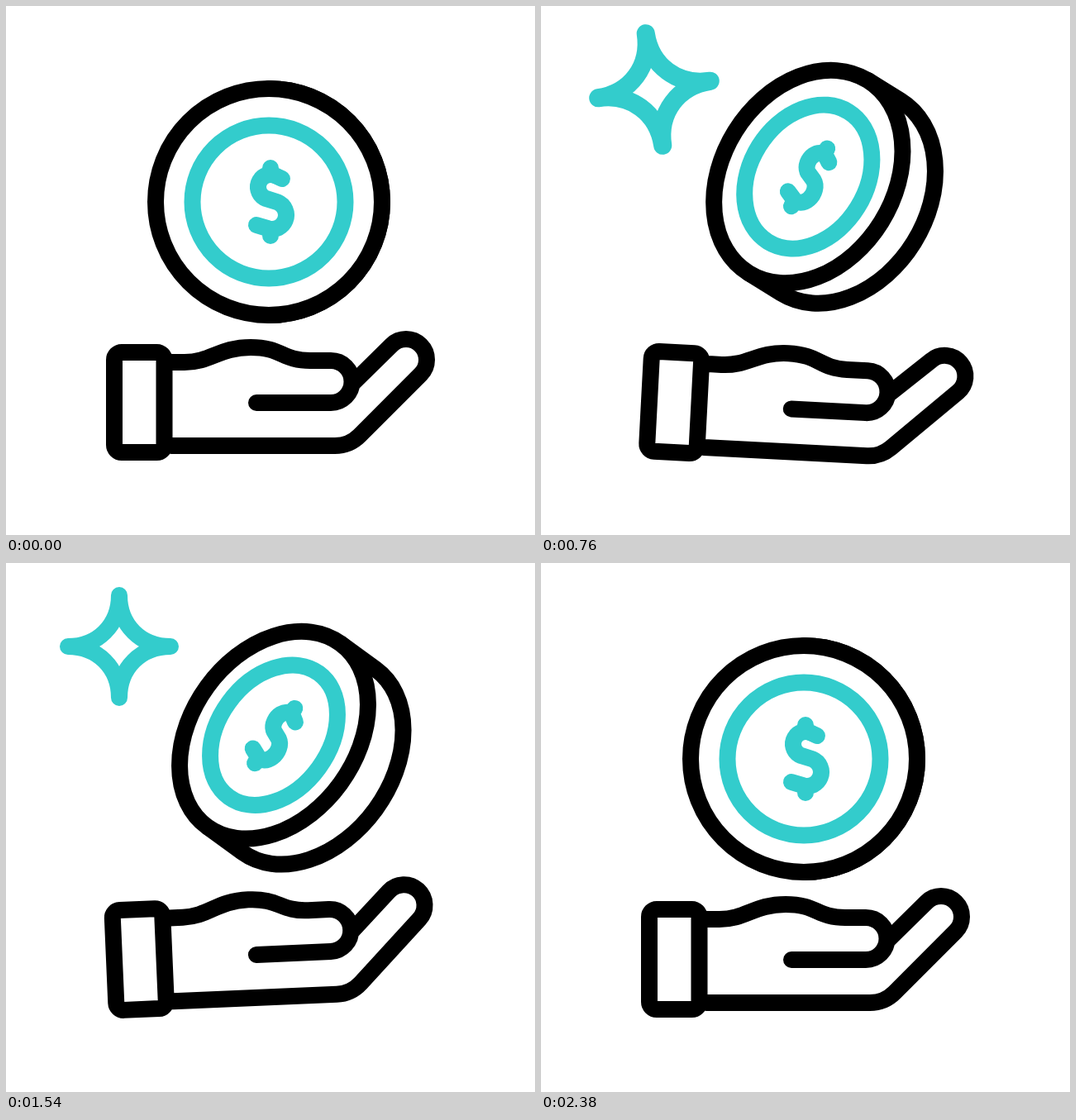
These frames come from a looping animation (640 by 640 pixels, 2.4 s). An HTML page with a canvas:

```html
<!DOCTYPE html>
<html lang="en">
<head>
<meta charset="utf-8">
<title>Coin toss</title>
<style>
  html, body { margin: 0; width: 100%; height: 100%; overflow: hidden; background: #fff; }
  canvas { display: block; }
</style>
</head>
<body>
<canvas id="stage" width="640" height="640"></canvas>
<script>
const ctx = document.getElementById('stage').getContext('2d');
const LOOP = 2400, BLACK = '#000', TEAL = '#33cccc', RAD = Math.PI / 180;

const progress = (t, from, to) => Math.min(1, Math.max(0, (t - from) / (to - from)));

function ramp(t, from, to) {
  const u = progress(t, from, to);
  return u * u * (3 - 2 * u);
}

// Rises from 0 to 1 and falls back
const pulse = (t, rise, top, fall, end) => ramp(t, rise, top) - ramp(t, fall, end);

// The hand dips and flicks up twice, then settles
const handAngle = t => 17 * pulse(t, 0, 380, 380, 590)
  + 19.7 * pulse(t, 600, 1000, 1000, 1280)
  - 4 * pulse(t, 380, 590, 1280, 1900);

// The finger trails behind the hand
const fingerBend = t => 13 * (pulse(t, 0, 380, 440, 690) + pulse(t, 690, 960, 1120, 1400));

// The coin sinks a little and hops twice
const coinY = t => 237 + 11 * pulse(t, 0, 420, 1480, 1980)
  - 44 * pulse(t, 415, 720, 720, 1000)
  - 41 * pulse(t, 1110, 1480, 1480, 1980);

// Steep S-curve: 0 to 1 in the first half of the loop, back in the second
function coinTilt(t) {
  const half = LOOP / 2, u = (t % half) / half;
  const a = u ** 2.7, e = a / (a + (1 - u) ** 2.7);
  return t < half ? e : 1 - e;
}

function stroke(color) {
  ctx.strokeStyle = color;
  ctx.stroke();
}

function ellipse(rx, ry, color) {
  ctx.beginPath();
  ctx.ellipse(0, 0, rx, ry, 0, 0, 2 * Math.PI);
  ctx.fill();
  stroke(color);
}

function drawDollar(squash) {
  ctx.save();
  ctx.scale(squash, 1);
  ctx.translate(2, 0);
  ctx.beginPath();
  for (const side of [-1, 1]) {
    ctx.moveTo(0, 41 * side);
    ctx.lineTo(0, 33 * side);
  }
  ctx.moveTo(14, -28);
  ctx.arc(0, -18, 15, -60 * RAD, 112 * RAD, true);
  ctx.arc(2, 16, 17, -68 * RAD, 105 * RAD);
  ctx.lineTo(-17, 28);
  ctx.restore(); // keeps the line weight even
  stroke(TEAL);
}

function drawCoin(t) {
  const p = coinTilt(t), squash = 1 - 0.295 * p, r = 137;
  ctx.save();
  ctx.translate(318 + 6.5 * p, coinY(t));
  ctx.rotate(39 * p * RAD);
  ctx.beginPath();
  ctx.moveTo(0, -r);
  ctx.ellipse(57 * p, 0, r * squash, r, 0, -Math.PI / 2, Math.PI / 2);
  ctx.lineTo(0, r);
  ctx.fill();
  stroke(BLACK);
  ellipse(r * squash, r, BLACK);
  ellipse(92.5 * squash, 92.5, TEAL);
  drawDollar(squash);
  ctx.restore();
}

function drawFinger(bend) {
  const c = Math.cos(bend), s = Math.sin(bend), r = 25, floor = 532;
  const x = 415 + 69 * c + 61 * s, y = 489 + 69 * s - 61 * c;
  const dir = bend - Math.PI / 4;
  const lowX = x - r * Math.sin(dir), lowY = y + r * Math.cos(dir);
  const cornerX = lowX + (floor - lowY) / Math.tan(dir);
  ctx.moveTo(421, 455);
  ctx.arc(x, y, r, dir - Math.PI / 2, dir + Math.PI / 2);
  ctx.arcTo(cornerX, floor, 200, floor, 42);
  ctx.lineTo(200, floor);
}

function drawHand(t) {
  ctx.save();
  ctx.translate(161.5, 479);
  ctx.rotate(handAngle(t) * RAD);
  ctx.translate(-161.5, -479);
  ctx.beginPath();
  ctx.roundRect(131, 419, 60.5, 121, 9);
  ctx.moveTo(200, 431);
  ctx.lineTo(216, 431);
  ctx.bezierCurveTo(248, 431, 258, 413, 296, 413);
  ctx.bezierCurveTo(334, 413, 334, 429, 368, 429);
  ctx.arc(393, 454.5, 25.5, -Math.PI / 2, Math.PI / 2);
  ctx.lineTo(303, 480);
  drawFinger(fingerBend(t) * RAD);
  stroke(BLACK);
  ctx.restore();
}

// Pops in with a quarter turn and overshoot, and shrinks away the same way unturned
function drawStar(t) {
  const grow = progress(t, 500, 830), shrink = progress(t, 1930, 1600);
  const w = 1 - Math.min(grow, shrink);
  if (w === 1) return;
  const size = 1 - 4.3 * w ** 3 + 3.3 * w ** 2, tip = 62, pull = 26;
  ctx.save();
  ctx.translate(137, 101);
  ctx.rotate(-Math.PI / 2 * (1 - grow) ** 1.5);
  ctx.scale(size, size);
  ctx.beginPath();
  ctx.moveTo(0, -tip);
  for (let i = 0; i < 4; i++) {
    ctx.bezierCurveTo(0, -pull, pull, 0, tip, 0);
    ctx.rotate(Math.PI / 2);
  }
  ctx.closePath();
  stroke(TEAL);
  ctx.restore();
}

function frame() {
  const t = performance.now() % LOOP;
  ctx.fillStyle = '#fff';
  ctx.fillRect(0, 0, 640, 640);
  ctx.lineWidth = 20;
  ctx.lineCap = ctx.lineJoin = 'round';
  drawStar(t);
  drawCoin(t);
  drawHand(t);
  requestAnimationFrame(frame);
}
frame();
</script>
</body>
</html>
```
